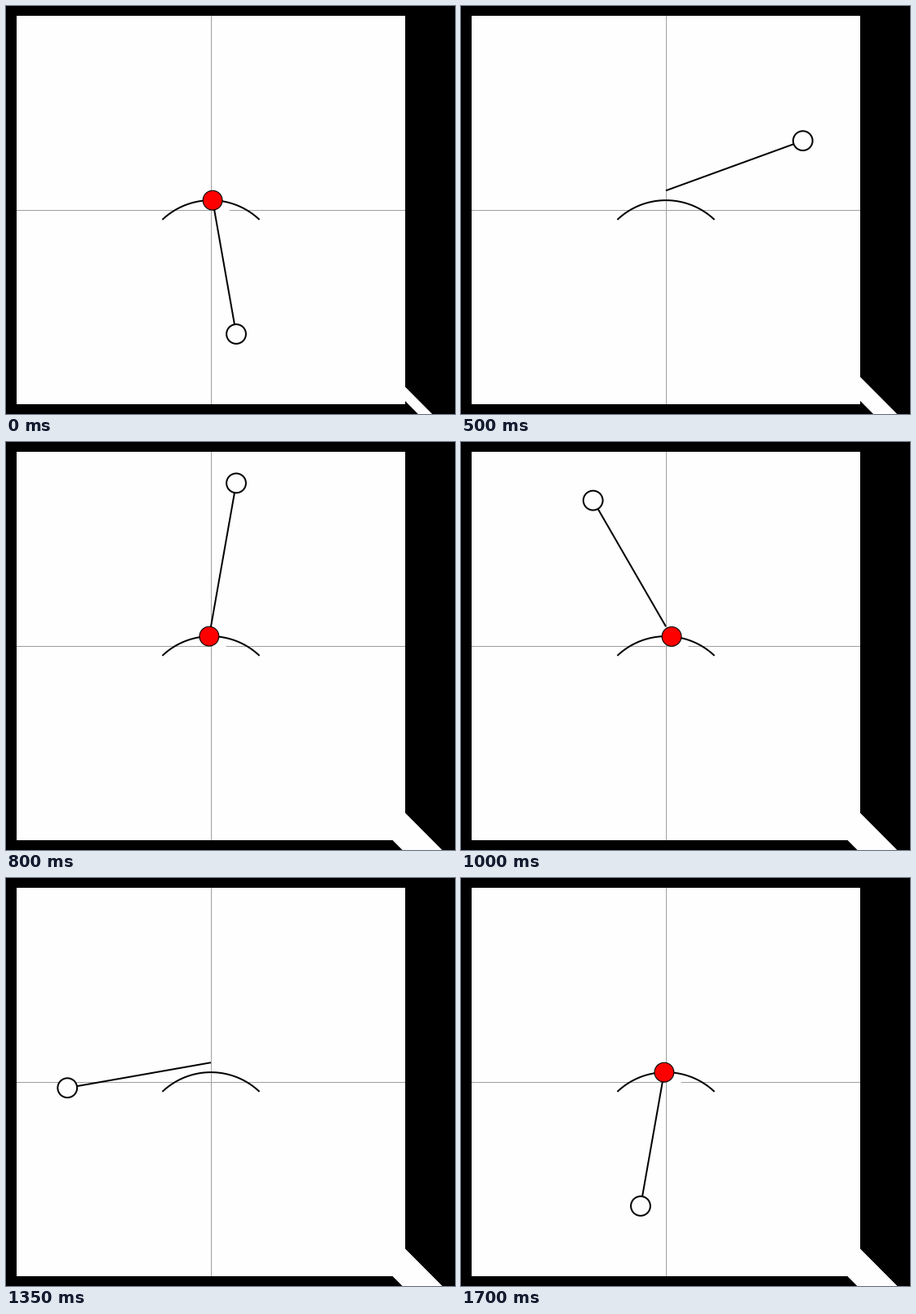
A matplotlib script for the animation above (1750 ms loop, 550x500 px).

```python
import numpy as np
import matplotlib.pyplot as plt
from matplotlib.animation import FuncAnimation
from matplotlib.patches import Circle, Polygon, Rectangle

W, H, DPI = 550, 500, 100
FRAMES, INTERVAL = 35, 50
UNIT = 11.9
CX, CY = 251, 250
PIVOT_Y = 2.0
ARM = 15
ARC_R, ARC_Y = 7.25, -6.25
PAPER = "#fefefe"
REMOTE = (10000, 10060)   # where the band runs when there is no second crossing


def px(x, y):
    return np.array([CX + UNIT * x, CY - UNIT * y])


def lw(pixels):
    return pixels * 72 / DPI


def along(theta, t):
    """Point at distance t from the pivot; theta is measured from straight down."""
    return t * np.sin(theta), PIVOT_Y - t * np.cos(theta)


def crossings(theta):
    """Points where the arm's line meets the arc, nearest to the pivot first."""
    d = PIVOT_Y - ARC_Y
    b = d * np.cos(theta)
    disc = b * b - d * d + ARC_R ** 2
    if disc < 0:
        return []
    roots = sorted((b - np.sqrt(disc), b + np.sqrt(disc)), key=abs)
    points = [along(theta, t) for t in roots]
    return [px(x, y) for x, y in points if abs(x) <= 5 and y >= -1.01]


def band(points):
    """Corners of the white band that starts at the first crossing."""
    a = points[0]
    b = points[1] if len(points) > 1 else a + np.array(REMOTE) / 10
    u = (b - a) / np.hypot(*(b - a))
    n = np.array([-u[1], u[0]]) * UNIT / 2
    return np.array([a + n, b + n, b - n, a - n])


fig = plt.figure(figsize=(W / DPI, H / DPI), dpi=DPI, facecolor="black")
ax = fig.add_axes([0, 0, 1, 1])
ax.set_xlim(0, W)
ax.set_ylim(H, 0)
ax.axis("off")

angles = np.radians(10 * (np.arange(FRAMES) + 1))
hits = [crossings(a) for a in angles]

# Bands stay visible outside the sheet once they have been drawn.
trails = []
for points in hits:
    trail = None
    if points:
        trail = ax.add_patch(Polygon(band(points), fc=PAPER, ec="none",
                                     zorder=1, visible=False))
    trails.append(trail)

ax.add_patch(Rectangle((13, 12), 476, 476, fc=PAPER, ec="none", zorder=2))
for xs, ys in (((13, 489), (250.5, 250.5)), ((251.5, 251.5), (12, 488))):
    ax.plot(xs, ys, color="#a0a0a0", lw=lw(1), snap=False,
            solid_capstyle="butt", zorder=3)

half = np.arcsin(5 / ARC_R)
s = np.linspace(-half, half, 80)
ax.plot(*px(ARC_R * np.sin(s), ARC_Y + ARC_R * np.cos(s)), color="black",
        lw=lw(2), solid_capstyle="butt", zorder=4)

arm, = ax.plot([], [], color="black", lw=lw(2), solid_capstyle="butt", zorder=5)
bob = ax.add_patch(Circle((0, 0), UNIT, fc=PAPER, ec="black", lw=lw(2), zorder=6))
cover = ax.add_patch(Polygon(np.zeros((4, 2)), fc=PAPER, ec="none", zorder=7))
dots = [ax.add_patch(Circle((0, 0), UNIT, fc="red", ec="black", lw=lw(1.1), zorder=8))
        for _ in range(2)]


def draw(i):
    start, end = px(0, PIVOT_Y), px(*along(angles[i], ARM))
    arm.set_data(*zip(start, end))
    bob.center = end
    for k, trail in enumerate(trails):
        if trail:
            trail.set_visible(k <= i)
    points = hits[i]
    cover.set_visible(bool(points))
    if points:
        cover.set_xy(band(points))
    for k, dot in enumerate(dots):
        dot.set_visible(k < len(points))
        if k < len(points):
            dot.center = points[k]
    return [arm, bob, cover, *dots]


anim = FuncAnimation(fig, draw, frames=FRAMES, interval=INTERVAL,
                     init_func=lambda: draw(0), repeat=True, repeat_delay=0,
                     blit=False)
plt.show()
```
